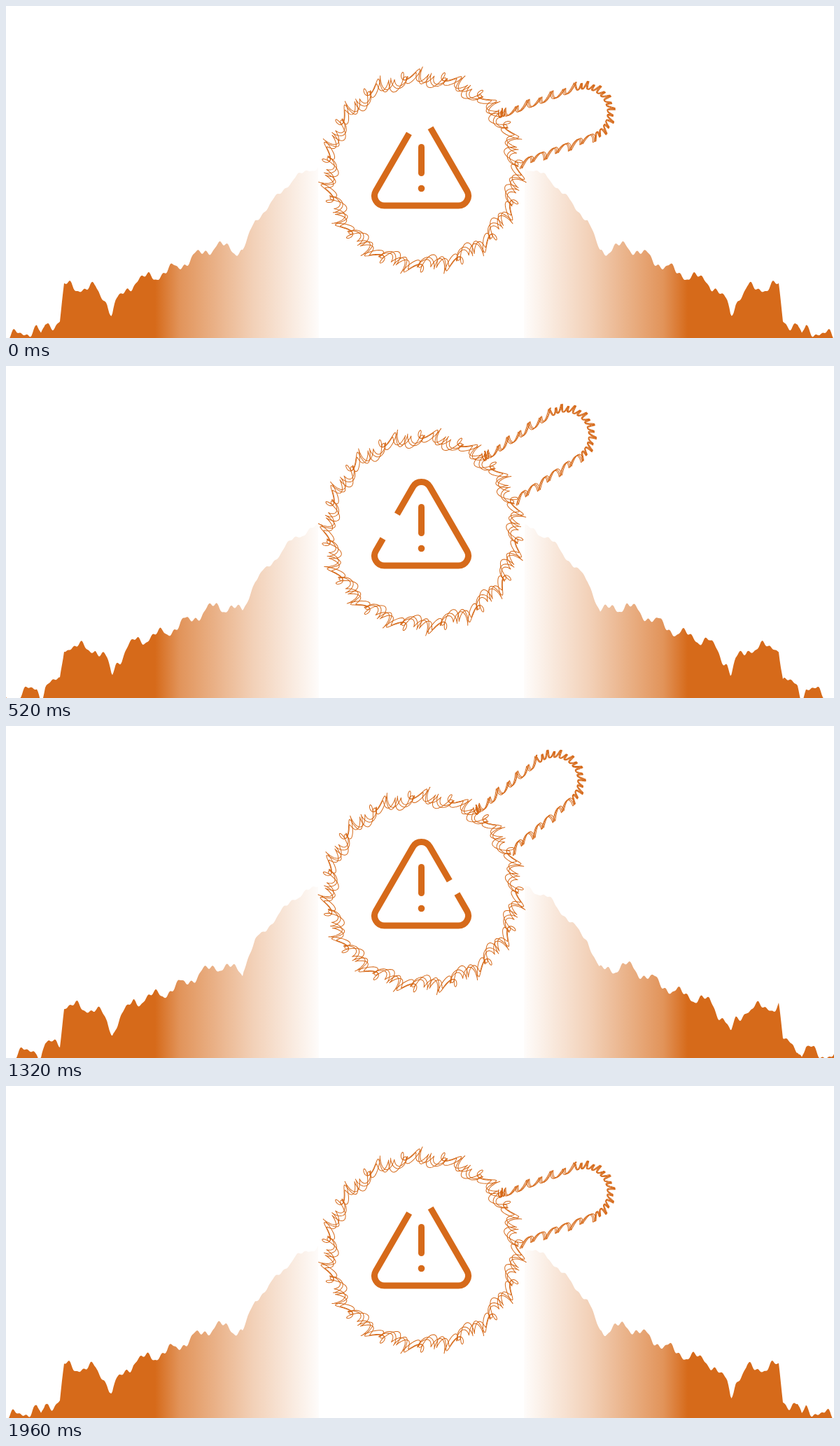
Write an HTML page that moves like this. It is 1183 by 474 pixels and loops after 2000 ms.

```html
<!DOCTYPE html>
<html lang="en">
<head>
<meta charset="utf-8">
<title>Warning search</title>
<style>
  html, body { margin: 0; width: 100%; height: 100%; overflow: hidden; background: #fff; }
  svg { display: block; width: 100vw; height: 100vh; }
</style>
</head>
<body>
<svg viewBox="0 0 1183 474">
  <defs>
    <linearGradient id="fade" gradientUnits="userSpaceOnUse" x1="213" x2="447" y1="0" y2="0">
      <stop offset="0" stop-color="#d66a1a"/>
      <stop offset=".15" stop-color="#d66a1a" stop-opacity=".72"/>
      <stop offset=".6" stop-color="#d66a1a" stop-opacity=".31"/>
      <stop offset="1" stop-color="#d66a1a" stop-opacity=".02"/>
    </linearGradient>
  </defs>
  <path id="left" fill="url(#fade)"/>
  <path id="right" fill="url(#fade)" transform="translate(1187) scale(-1 1)"/>
  <g id="lens" fill="none" stroke="#d66a1a" stroke-linejoin="round"></g>
  <g fill="none" stroke="#d66a1a" stroke-width="9">
    <path id="triangle" pathLength="406" d="M581.4 172.5L528.4 264A14 14 0 0 0 540.5 285H646.5A14 14 0 0 0 658.6 264L605.6 172.5A14 14 0 0 0 581.4 172.5Z"/>
    <path d="M593.5 201.5V238.5" stroke-linecap="round"/>
    <circle cx="593.5" cy="260.5" r="4.8" fill="#d66a1a" stroke="none"/>
  </g>
</svg>
<script>
const TAU = 2 * Math.PI, LOOP = 2000, PERIMETER = 406;
const $ = id => document.getElementById(id);
const { sin, cos, abs, max } = Math;
const toPath = pts => 'M' + pts.map(p => p[0].toFixed(1) + ' ' + p[1].toFixed(1)).join('L');

// Corners of the hill; the right hill mirrors them.
const corners = [
  [-4, 476], [77, 450], [83, 400], [128, 404], [152, 430], [182, 394],
  [230, 380], [300, 342], [338, 350], [356, 307], [411, 246], [447, 228]
];
const notch = (x, at, depth) => depth * max(0, 1 - abs(x - at) / 6);

function ridge(x) {
  const i = corners.findIndex(c => c[0] >= x);
  const [x0, y0] = corners[max(i, 1) - 1], [x1, y1] = corners[max(i, 1)];
  return y0 + (y1 - y0) * (x - x0) / (x1 - x0) + notch(x, 50, 14) + notch(x, 151, 12);
}

// Ripples run along the hill, one wavelength per second.
function hill(t, dir) {
  const pts = [[-4, 480]];
  for (let x = -4; x <= 447; x += 1.5) {
    const p = TAU * ((x - 87) / 37.2 - dir * t / 1000);
    const size = x > 338 ? .5 : 1;
    const wave = 6.5 * cos(p) + 2.2 * cos(2 * p + x * .05) + 1.8 * cos(3 * p + x * .11);
    pts.push([x, ridge(x) - size * wave]);
  }
  pts.push([447, 480]);
  return toPath(pts) + 'Z';
}

// Moves a base point along its normal and its tangent.
const shift = ([x, y, nx, ny], out, lean) => [x + nx * out - ny * lean, y + ny * out + nx * lean];

function ring(phase) {
  const pts = [];
  for (let i = 0; i < 1080; i++) {
    const a = TAU * i / 1080;
    const out = 7 * cos(45 * a + phase) + 4.5 * cos(15 * a + phase * .6) + 3.5 * cos(30 * a + phase * 2);
    const lean = 5 * cos(45 * a + phase + .8) + 2 * cos(30 * a);
    pts.push(shift([134 * cos(a), 134 * sin(a), cos(a), sin(a)], out, lean));
  }
  return toPath(pts) + 'Z';
}

function handle(phase) {
  const pts = [];
  const part = (cycles, tilt, base) => {
    for (let i = 0; i < cycles * 20; i++) {
      const p = TAU * i / 20 + phase;
      pts.push(shift(base(i / cycles / 20), 5 * cos(p) + 1.5 * cos(p / 2), tilt * cos(p + .5)));
    }
  };
  part(3, 2, u => [131 + 8 * u, -39, 0, -1]);
  part(6, 4.5, u => [139 + 108 * u, -38, 0, -1]);
  part(14, 2, u => {
    const a = Math.PI * (u - .5);
    return [247 + 37 * cos(a), 38 * sin(a), cos(a), sin(a)];
  });
  part(6, 4.5, u => [247 - 112 * u, 38, 0, 1]);
  return toPath(pts);
}

$('lens').innerHTML = [0, 1.1, 2.4]
  .map(phase => `<path d="${ring(phase)}"/><path d="${handle(phase * .6)}"/>`)
  .join('');

const easeInOut = u => u < .5 ? 2 * u * u : 1 - 2 * (1 - u) ** 2;

function draw(t) {
  const u = t / LOOP;
  $('left').setAttribute('d', hill(t, 1));
  $('right').setAttribute('d', hill(t, -1));
  $('lens').setAttribute('transform', `translate(595 236) rotate(${13 * cos(TAU * u) - 33})`);

  // The gap circles the triangle once and narrows late in the loop.
  const open = 31.5 + 10.5 * cos(TAU * u ** 1.9);
  const head = PERIMETER * easeInOut(u ** .88) - 31 + open;
  $('triangle').setAttribute('stroke-dasharray', `${PERIMETER - open} ${open}`);
  $('triangle').setAttribute('stroke-dashoffset', -head);
}

const start = performance.now();
function tick() {
  draw((performance.now() - start) % LOOP);
  requestAnimationFrame(tick);
}
tick();
</script>
</body>
</html>
```
